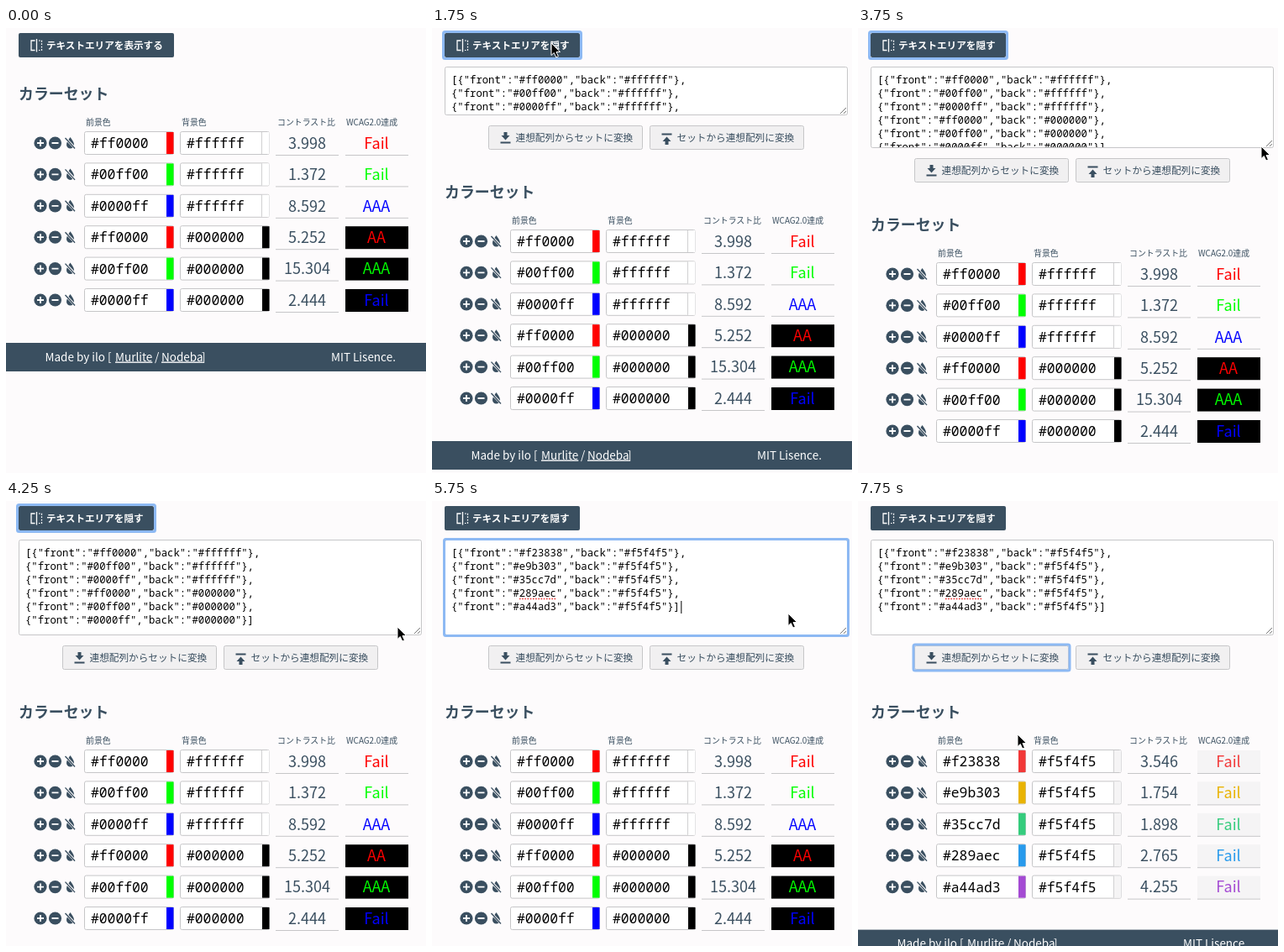
Animation, 500 px wide and 530 px high, one loop 8 s. Source, as an HTML page:

```html
<!DOCTYPE html>
<html lang="ja">
<head>
<meta charset="utf-8">
<style>
html, body { margin: 0; width: 100%; height: 100%; overflow: hidden; background: #fdfbfc; }
svg { display: block; }
text { font-family: "Noto Sans CJK JP", "Noto Sans CJK", "Noto Sans", sans-serif; white-space: pre; }
.mono { font-family: "Noto Sans Mono", "DejaVu Sans Mono", monospace; }
</style>
</head>
<body>
<svg id="stage" width="500" height="530" viewBox="0 0 500 530"></svg>
<script>
const stage = document.getElementById('stage');
const LOOP = 8000, STEP = 250, SLATE = '#3a4f60', CHAR = 7.36;

const before = [
  ...['#ff0000', '#00ff00', '#0000ff'].map(c => [c, '#ffffff']),
  ...['#ff0000', '#00ff00', '#0000ff'].map(c => [c, '#000000'])
];
const after = ['#f23838', '#e9b303', '#35cc7d', '#289aec', '#a44ad3'].map(c => [c, '#f5f4f5']);

// pointer tip: time, x, y
const pointer = [
  [250, 157, -4], [500, 152, 20], [750, 142, 18], [1750, 142, 18], [2000, 205, 48],
  [2250, 340, 84], [2500, 455, 99], [2750, 482, 101], [3000, 482, 102], [3250, 482, 106],
  [3750, 480, 141], [4000, 480, 158], [4250, 466, 150], [4500, 440, 138], [4750, 424, 134],
  [6000, 424, 134], [6250, 385, 146], [6500, 290, 172], [6750, 222, 190], [7250, 222, 190],
  [7500, 207, 234], [7750, 190, 278]
];
// bottom edge of the text area: time, y
const bottomEdge = [[1750, 104], [2750, 104], [3000, 105], [3250, 109], [4000, 160]];

function along(keys, t) {
  if (t < keys[0][0]) return null;
  const i = keys.findIndex(k => k[0] > t);
  if (i < 0) return keys[keys.length - 1].slice(1);
  const a = keys[i - 1], b = keys[i], p = (t - a[0]) / (b[0] - a[0]);
  return a.slice(1).map((v, j) => v + (b[j + 1] - v) * p);
}

const rect = (x, y, w, h, fill, more = '') =>
  `<rect x="${x}" y="${y}" width="${w}" height="${h}" fill="${fill}" ${more}/>`;
const path = (d, color, width = 1, more = '') =>
  `<path d="${d}" fill="none" stroke="${color}" stroke-width="${width}" ${more}/>`;
const text = (x, y, size, str, fill = SLATE, more = '') =>
  `<text x="${x}" y="${y}" font-size="${size}" fill="${fill}" ${more}>${str}</text>`;
const group = (x, y, body) => `<g transform="translate(${x} ${y})">${body}</g>`;
const ring = (x, y, w, h) => rect(x, y, w, h, 'none', 'stroke="#8db9f3" stroke-width="3" rx="2"');
const outline = 'stroke="#c6c6c8" rx="2"';
const medium = 'font-weight="500"', bold = 'font-weight="700"', middle = 'text-anchor="middle"';

function luminance(hex) {
  const [r, g, b] = [1, 3, 5].map(i => {
    const v = parseInt(hex.slice(i, i + 2), 16) / 255;
    return v <= 0.03928 ? v / 12.92 : ((v + 0.055) / 1.055) ** 2.4;
  });
  return 0.2126 * r + 0.7152 * g + 0.0722 * b;
}

function contrast(a, b) {
  const [lo, hi] = [luminance(a), luminance(b)].sort((p, q) => p - q);
  return (hi + 0.05) / (lo + 0.05);
}

function toggle(open) {
  const w = open ? 161 : 185;
  return rect(15, 6, w, 29, SLATE, 'rx="2"') +
    path('M34.5 15H30V26.5H34.5M36.5 13V28.5', '#fff', 1.3) +
    path('M39 15H42.5V26.5H39', '#fff', 1.2, 'stroke-dasharray="1.8 1.6"') +
    text(48, 24.5, 11.6, open ? 'テキストエリアを隠す' : 'テキストエリアを表示する', '#fff', bold);
}

function convertButton(x, label, up) {
  const arrow = up ? 'M0 -1.5L5 4H2V8H-2V4H-5Z' : 'M0 2.5L5 -3H2V-7H-2V-3H-5Z';
  return rect(x + 0.5, 0.5, 183, 28, '#f1f0f1', outline) +
    group(x + 20.5, 15, `<path d="${arrow}" fill="${SLATE}"/>` +
      rect(-6, up ? -5.5 : 4.5, 12, 2, SLATE)) +
    text(x + 32.5, 18.7, 11.65, label, SLATE, medium);
}

function textArea(bottom, sets, focused, selected, checked) {
  const lines = sets.map(([f, b], i) =>
    `${i ? '' : '[{'}${i ? '{' : ''}"front":"${f}","back":"${b}"}${i < sets.length - 1 ? ',' : ']'}`);
  const last = lines.length - 1, words = ['ffffff', '289aec'];
  let body = '';
  lines.forEach((line, i) => {
    const y = 62 + 16 * i, width = line.length * CHAR;
    if (selected) body += rect(23, y - 7, width + (i < last ? CHAR : 0), 16, '#b4d5fe');
    body += text(23, y + 4, CHAR / 0.6, line, '#000', 'class="mono"');
    if (checked) for (const word of words) {
      const at = line.indexOf(word);
      if (at >= 0) body += path(`M${23 + at * CHAR} ${y + 6.5}h${6 * CHAR}`, '#e33', 1.6, 'stroke-dasharray="1.6 1.6"');
    }
  });
  if (focused && !selected) {
    body += rect(24 + lines[last].length * CHAR, 55 + 16 * last, 1, 15, '#000');
  }
  return rect(15.5, 46.5, 479, bottom - 47, '#fff', outline) +
    `<clipPath id="area"><rect x="16" y="47" width="478" height="${bottom - 48}"/></clipPath>` +
    `<g clip-path="url(#area)">${body}</g>` +
    path(`M486 ${bottom - 2}l7 -7M490 ${bottom - 2}l3 -3`, '#777') +
    (focused ? ring(14.5, 45.5, 481, bottom - 45) : '');
}

function field(x, color) {
  return rect(x + 0.5, -13.5, 106, 27, '#fff', outline) +
    rect(x + 98, -13, 8.5, 26, color) +
    (luminance(color) > 0.85 ? path(`M${x + 97.5} -13V13`, '#d0d0d2') : '') +
    text(x + 8, 6, 16.35, color, '#000', 'class="mono"');
}

function row([front, back], i) {
  const ratio = contrast(front, back);
  const level = ratio >= 7 ? 'AAA' : ratio >= 4.5 ? 'AA' : 'Fail';
  const discs = [41, 58.5].map(x => `<circle cx="${x}" cy="0" r="7.6" fill="${SLATE}"/>`).join('');
  const drop = `<path d="M76.5 -7C79 -3.5 81 -1 81 2A4.5 4.5 0 0 1 72 2C72 -1 74 -3.5 76.5 -7Z" fill="${SLATE}"/>` +
    path('M70 -6.5L82.5 6.5', '#fdfbfc', 3) + path('M70.5 -6L82 6.5', SLATE, 1.4);
  return group(0, 137 + 37.4 * i, discs +
    path('M37 0h8M41 -4v8M54.5 0h8', '#fff', 1.8) + drop +
    field(93, front) + field(207, back) +
    path('M321 14.5H396', '#c6c6c8') +
    text(358.5, 6.7, 18, ratio.toFixed(3), SLATE, middle) +
    (back === '#ffffff' ? '' : rect(404, -13, 75, 27, back)) +
    (back === '#000000' ? '' : path('M404 14.5H479', '#c6c6c8')) +
    text(441, 6.7, 18, level, front, `${middle} ${medium}`));
}

function footer(y) {
  const word = (x, str) => text(x, 21.5, 13.5, str, '#fff', medium);
  const link = (x, str) => text(x, 21.5, 13.5, str, '#fff', `${medium} text-decoration="underline"`);
  return group(0, y, rect(0, 0, 500, 34, SLATE) +
    word(46.5, 'Made by ilo [') + link(130, 'Murlite') + word(177, '/') +
    link(185, 'Nodeba') + word(233, ']') + word(387, 'MIT Lisence.'));
}

function draw(t) {
  const edge = along(bottomEdge, t), bottom = edge && Math.round(edge[0]);
  const sets = t < 7250 ? before : after;
  let out = toggle(edge);
  if (edge) {
    if (t < 4750) out += ring(13.5, 4.5, 164, 32);
    out += textArea(bottom, t < 5750 ? before : after, t >= 4750 && t < 7000,
      t >= 5250 && t < 5750, t >= 4750);
    out += group(0, bottom + 12,
      convertButton(67, '連想配列からセットに変換', false) +
      convertButton(259, 'セットから連想配列に変換', true) +
      (t >= 7000 ? ring(66, -1, 186, 31) : ''));
  }
  const labels = [[95, '前景色'], [209, '背景色'], [323, 'コントラスト比'], [405, 'WCAG2.0達成']];
  out += group(0, edge ? bottom + 13 : 0,
    text(15, 85, 17.9, 'カラーセット', SLATE, bold) +
    labels.map(([x, s]) => text(x, 115.7, 9.9, s)).join('') +
    sets.map(row).join('') +
    footer(375 - (6 - sets.length) * 37.4));
  const tip = along(pointer, t);
  if (tip) out += group(...tip,
    '<path d="M0 0V14.5L3.3 11.5L5.8 17L8.4 15.8L6 10.5H10.6Z" fill="#000" stroke="#fff"/>');
  stage.innerHTML = out;
}

let shown = -1;
function tick() {
  const t = Math.floor(performance.now() % LOOP / STEP) * STEP;
  if (t !== shown) draw(shown = t);
  requestAnimationFrame(tick);
}
tick();
</script>
</body>
</html>
```
